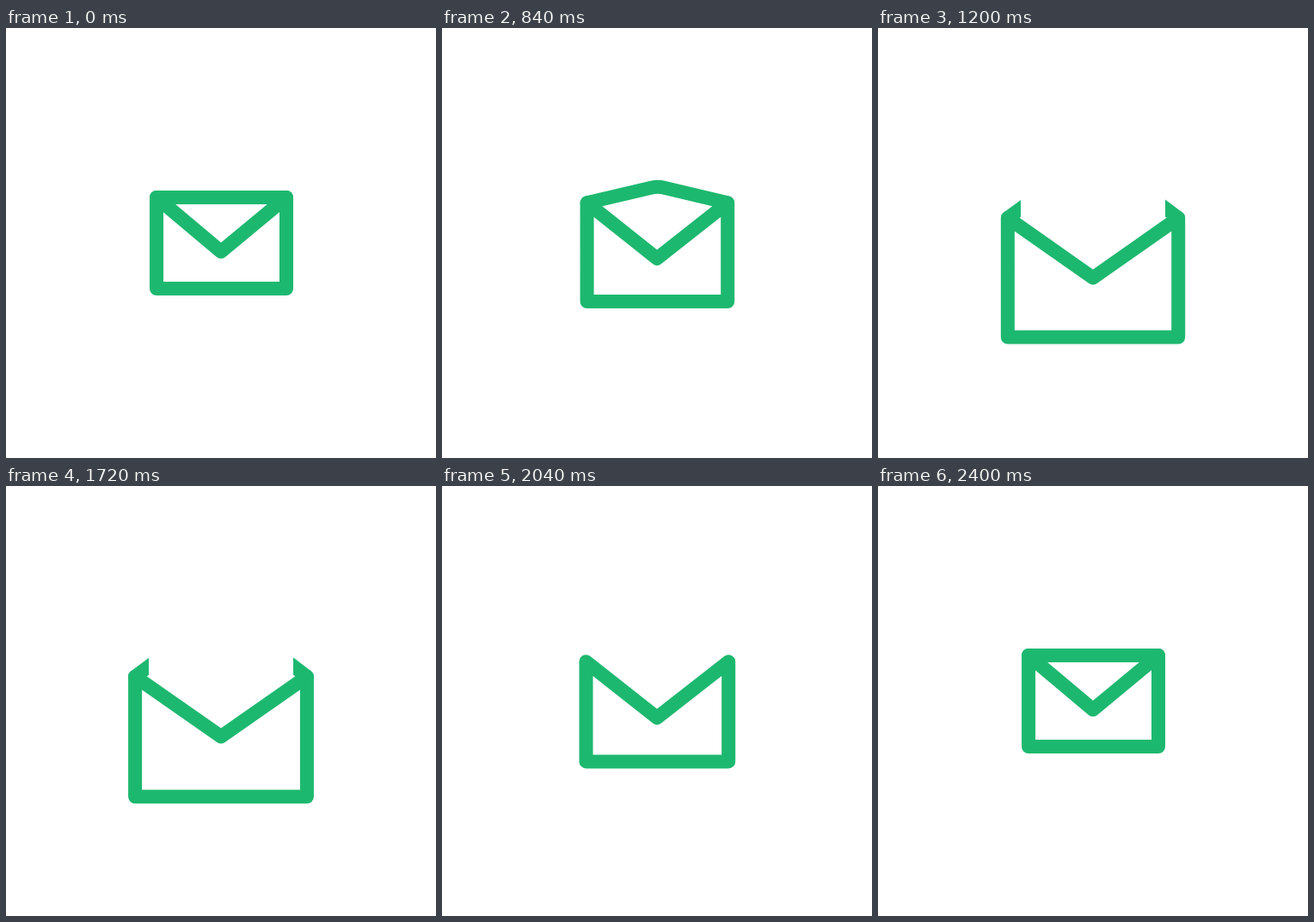
These frames come from a looping animation (500x500 px, 3000 ms). An HTML page with a canvas:

```html
<!DOCTYPE html>
<html lang="en">
<head>
<meta charset="utf-8">
<title>Envelope</title>
<style>
  html, body { margin: 0; width: 100%; height: 100%; overflow: hidden; background: #fff; }
  canvas { display: block; width: 500px; height: 500px; }
</style>
</head>
<body>
<canvas id="stage" width="500" height="500"></canvas>
<script>
const ctx = document.getElementById('stage').getContext('2d');
const GREEN = '#1db86f';
const LOOP = 3000;
const STEP = 40;

const mix = (a, b, p) => a + (b - a) * p;

// Cubic easing with control points (0.5, 0) and (0.26, 1).
function ease(x) {
  if (x <= 0) return 0;
  if (x >= 1) return 1;
  let lo = 0, hi = 1;
  for (let i = 0; i < 30; i++) {
    const u = (lo + hi) / 2, v = 1 - u;
    if (1.5 * v * v * u + 0.78 * v * u * u + u * u * u < x) lo = u;
    else hi = u;
  }
  return lo * lo * (3 - 2 * lo);
}

const span = (t, start, length) => ease((t - start) / length);

function trace(points) {
  ctx.beginPath();
  points.forEach(([x, y]) => ctx.lineTo(x, y));
  ctx.closePath();
}

function drawLid(left, right, top, open) {
  const middle = mix(250.5, 251.5, open);
  const peak = mix(197, 146, open);
  const soft = 6.5;
  const rise = (top - peak) / (middle - left);
  const shoulder = peak + soft * rise;
  ctx.beginPath();
  ctx.moveTo(left, top);
  ctx.lineTo(middle - soft, shoulder);
  ctx.quadraticCurveTo(middle, peak, middle + soft, shoulder);
  ctx.lineTo(right, top);
  ctx.strokeStyle = GREEN;
  ctx.stroke();
}

function drawLetter(lift) {
  const top = mix(337, 129, lift);
  trace([[174, top], [322, top], [326, top + 10], [326, top + 260], [174, top + 260]]);
  ctx.fillStyle = ctx.strokeStyle = '#fff';
  ctx.fill();
  ctx.stroke();
}

function drawBody(left, right, top, open) {
  const bottom = mix(303, 361.5, open);
  const notch = mix(260, 291.5, open);
  trace([[left, top], [250, notch], [right, top], [right, bottom], [left, bottom]]);
  ctx.strokeStyle = GREEN;
  ctx.stroke();
}

function draw(t) {
  const rise = span(t, 600, 760);
  const open = rise - span(t, 1680, 720);
  const lift = rise - span(t, 1880, 720);
  const left = mix(175, 150, open);
  const right = mix(326, 350, open);
  const top = mix(197, 221.7, open);

  ctx.fillStyle = '#fff';
  ctx.fillRect(0, 0, 500, 500);
  ctx.lineWidth = 16;
  ctx.lineJoin = ctx.lineCap = 'round';
  drawLid(left, right, top, open);
  drawLetter(lift);
  drawBody(left, right, top, open);
}

const start = performance.now();
function tick() {
  const t = (performance.now() - start) % LOOP;
  draw(Math.floor(t / STEP) * STEP);
  requestAnimationFrame(tick);
}
tick();
</script>
</body>
</html>
```
